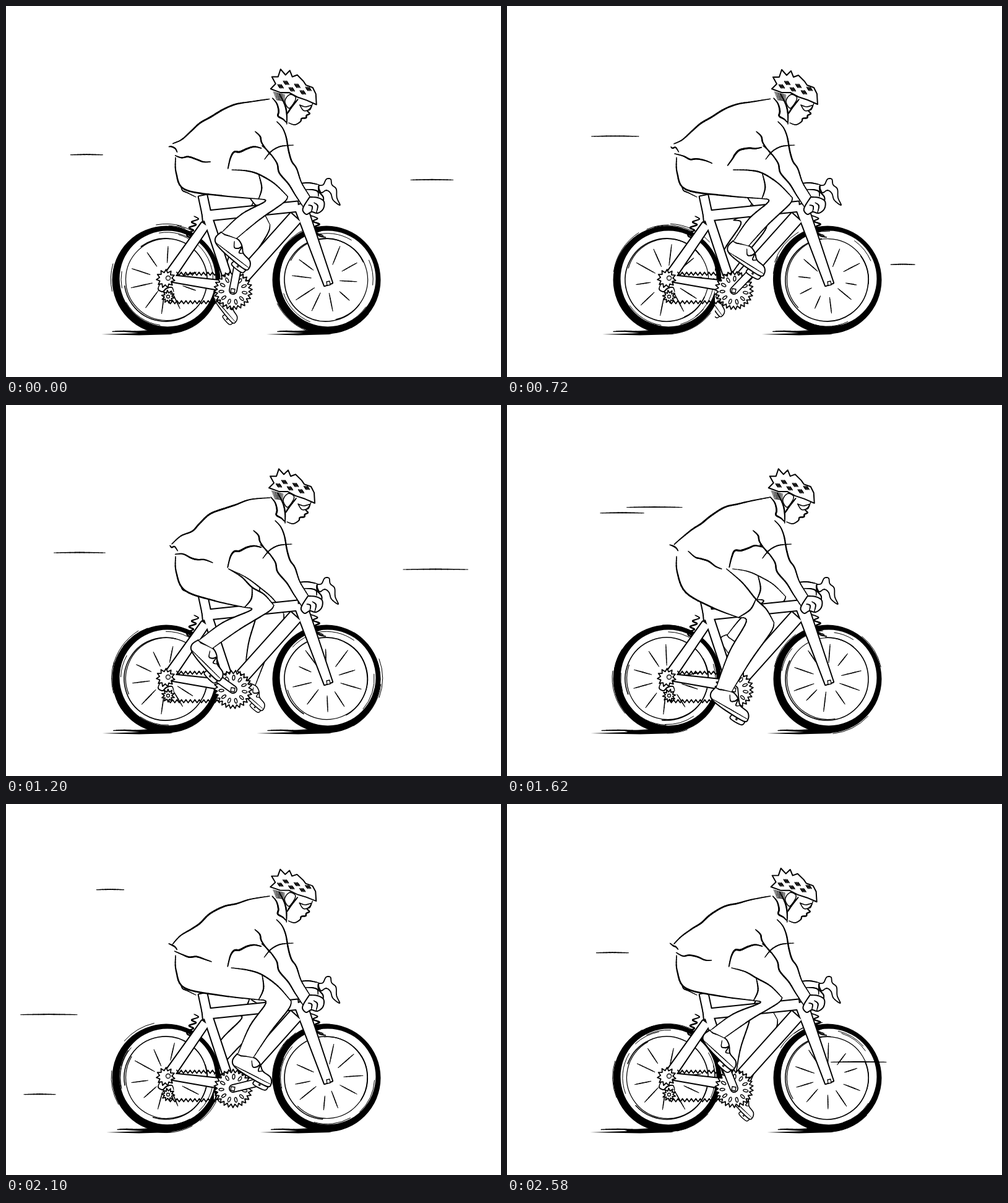
Recreate the animation shown at these times as an HTML page with a canvas. Size 800 by 600 pixels, loop 2.64 s.

```html
<!DOCTYPE html>
<html lang="en">
<head>
<meta charset="utf-8">
<title>Cyclist</title>
<style>
html, body { margin: 0; width: 100%; height: 100%; overflow: hidden; background: #fff; }
canvas { display: block; }
</style>
</head>
<body>
<canvas id="stage" width="800" height="600"></canvas>
<script>
const ctx = document.getElementById('stage').getContext('2d');
const STEP = 60, STEPS = 44, CYCLE = 11, TAU = Math.PI * 2, RAD = Math.PI / 180;
const HUB = [262, 440], FRONT = [521, 450], BOTTOM = [367, 460], CRANK = 44;

const nums = s => s.split(/[ ,]+/).map(Number);
const mix = (a, b, u) => a.map((v, i) => v + (b[i] - v) * u);
const flip = a => a.map((_, i) => a[a.length - 2 - i + 2 * (i % 2)]);

function random(seed) {
  return () => {
    seed = seed + 0x6D2B79F5 | 0;
    let t = Math.imul(seed ^ seed >>> 15, 1 | seed);
    t = t + Math.imul(t ^ t >>> 7, 61 | t) ^ t;
    return ((t ^ t >>> 14) >>> 0) / 4294967296;
  };
}

// Shakes the points of a line, more at its start
function ripple(a, size, rnd) {
  const phase = rnd() * TAU;
  return a.map((v, i) => v + size * (1 - 0.6 * i / a.length) *
    Math.sin(phase + (i >> 1) * 2 + (i % 2 ? 0 : 1.2)) * (i % 2 ? 1 : 0.5));
}

// Smooth run of points through the given ones
function smooth(a) {
  const n = a.length / 2, out = [];
  const at = i => { i = Math.max(0, Math.min(n - 1, i)); return [a[2 * i], a[2 * i + 1]]; };
  for (let i = 0; i < n - 1; i++) {
    const [p, q, r, s] = [-1, 0, 1, 2].map(d => at(i + d));
    for (let k = 0; k < 6; k++) {
      const u = k / 6;
      out.push(...[0, 1].map(j => q[j] + u / 2 * (r[j] - p[j] +
        u * (2 * p[j] - 5 * q[j] + 4 * r[j] - s[j] + u * (3 * q[j] - p[j] - 3 * r[j] + s[j])))));
    }
  }
  return out.concat(at(n - 1));
}

function shape(a) {
  ctx.beginPath();
  for (let i = 0; i < a.length; i += 2) ctx.lineTo(a[i], a[i + 1]);
}
function fill(a, color = '#fff') {
  shape(a);
  ctx.fillStyle = color;
  ctx.fill();
}
function outline(a, w = 2, paper = true) {
  shape(a);
  ctx.closePath();
  if (paper) { ctx.fillStyle = '#fff'; ctx.fill(); }
  ctx.lineWidth = w;
  ctx.stroke();
}
function blob(s, w) { outline(smooth(nums(s)), w); }

// Brush line that thins out at both ends
function ink(a, w = 2) {
  const p = smooth(typeof a === 'string' ? nums(a) : a), n = p.length / 2 - 1;
  for (let i = 0; i < n; i++) {
    ctx.lineWidth = w * (0.6 + 0.5 * Math.sin(Math.PI * (i + 0.5) / n));
    ctx.beginPath();
    ctx.moveTo(p[2 * i], p[2 * i + 1]);
    ctx.lineTo(p[2 * i + 2], p[2 * i + 3]);
    ctx.stroke();
  }
}
function arc(x, y, r, from = 0, to = TAU, w = 1.3) {
  ctx.beginPath();
  ctx.arc(x, y, r, from, to);
  ctx.lineWidth = w;
  ctx.stroke();
}
function gear(x, y, r, teeth, depth, turn) {
  const a = [];
  for (let i = 0; i < teeth * 2; i++) {
    const t = turn + i * Math.PI / teeth, d = r - (i % 2) * depth;
    a.push(x + d * Math.cos(t), y + d * Math.sin(t));
  }
  outline(a, 1.8);
}
function chain(x, end, y) {
  const a = [];
  for (let i = 0; x < end; x += 3.6, i++) a.push(x, y + (i % 2 ? 2.5 : -2.5));
  shape(a);
  ctx.lineWidth = 1.8;
  ctx.stroke();
}
function brake(x, y, lean) {
  const a = [];
  for (let i = 0; i < 8; i++) a.push(x + lean * i + (i % 2 ? 5 : -4), y + 4.6 * i);
  ink(a, 2.2);
  ink([x + lean * 6 - 4, y + 29, x + lean * 7, y + 33, x + lean * 7 + 9, y + 35], 2);
}

function shadow(left, right) {
  fill([left, 531, left + 60, 529, right - 45, 527, right, 524, right + 35, 531, right - 20, 532.5], '#000');
  ink([left + 18, 526.5, (left + right) / 2, 526, right, 528], 2);
}

function wheel(x, y, rnd) {
  ctx.beginPath();
  ctx.arc(x, y, 87.5, 0, TAU);
  ctx.arc(x + 2, y - 2, 77.5, 0, TAU);
  ctx.fillStyle = '#000';
  ctx.fill('evenodd');
  for (let i = 0; i < 10; i++) {
    const t = rnd() * TAU, r = i < 5 ? 86 : 74;
    arc(x + rnd() * 3 - 1, y - 1, r + rnd() * 4, t, t + 0.3 + rnd() * 0.7, 1);
  }
  const turn = rnd() * TAU;
  arc(x - 1, y, 67, turn, turn + 5.2, 1.6);
  arc(x + 0.5, y - 0.5, 66, turn + 3, turn + 7, 1.2);
  for (let i = 0; i < 10; i++) {
    const t = turn + (i + rnd() * 0.3) * TAU / 10, a = 21 + rnd() * 9, b = 47 + rnd() * 12;
    ink([x + a * Math.cos(t), y + a * Math.sin(t), x + b * Math.cos(t), y + b * Math.sin(t)], 1.5);
  }
}

function shoe(x, y, deg, size) {
  ctx.save();
  ctx.translate(x, y);
  ctx.rotate(deg * RAD);
  ctx.scale(size, size);
  blob('-8,1 -7,8 13,8 16,1', 1.8);
  blob('-53,-24 -55,-12 -48,-4 -25,0 13,1 18,-6 12,-15 -3,-18 -11,-25 -17,-29 -25,-31 -36,-28 -46,-24', 2);
  ink('-50,-5 -28,-5 -5,-5 17,-5', 1.3);
  ink('-27,-25 -21,-17 -15,-20 -12,-25 -10,-15 -4,-18', 1.7);
  arc(2, 4, 1.2);
  ctx.restore();
  const c = Math.cos(deg * RAD) * size, s = Math.sin(deg * RAD) * size;
  return (u, v) => [x + u * c - v * s, y + u * s + v * c];
}

// Every joint of the leg swings once per pedal turn
function leg(turn, far) {
  const swing = (mid, size, lag) => mid + size * Math.cos(turn - lag * RAD);
  const hem = [swing(404, 10, 75), swing(295, -25, 35)];
  const bend = [swing(389, 23, 44), swing(329, -18, 30)];
  const knee = [swing(441, 21, 58), swing(331, -23, 18)];
  const foot = swing(35, -10, 115);
  const px = BOTTOM[0] + CRANK * Math.sin(turn), py = BOTTOM[1] - CRANK * Math.cos(turn);
  const local = shoe(px, py, foot + (far ? 16 : 0), far ? 0.78 : 1);
  const heel = local(-52, -24), front = local(-27, -31);

  const tip = [362 - (hem[1] - 285) * 0.25, 265];
  const rise = mix(tip, hem, 0.5), cap = mix(hem, knee, 0.5);
  const thigh = [...tip, rise[0] + 2, rise[1] - 2, ...hem, cap[0] + 2, cap[1] - 3, ...knee];
  const under = [274, 245, 275, 270, 289, 297 + (bend[1] - 313) * 0.2,
    (289 + bend[0]) / 2, 104 + bend[1] * 0.65, ...bend];
  const nook = mix(bend, knee, 0.22), calf = mix(nook, heel, 0.5);
  const back = [...bend, nook[0], nook[1] + 5, calf[0] - 3, calf[1] - 2, ...heel];
  const cup = mix(knee, front, 0.12), mid = mix(knee, front, 0.55);
  const shin = [...knee, cup[0] + 3, cup[1] + 2, ...mid, ...front];

  if (!far) {
    fill([...smooth(under), ...smooth(back), ...flip(smooth(shin)), ...flip(smooth(thigh))]);
    ink(under, 2.4);
  }
  ink(thigh, far ? 1.6 : 2.1);
  ink(back, 1.9);
  ink(shin, 1.9);
  ink([...hem, (hem[0] + bend[0]) / 2 + 5, (hem[1] + bend[1]) / 2 + 2, ...bend], 2);
}

function crank(turn) {
  const [x, y] = BOTTOM;
  ctx.beginPath();
  ctx.moveTo(x, y);
  ctx.lineTo(x + CRANK * Math.sin(turn), y - CRANK * Math.cos(turn));
  ctx.lineWidth = 14;
  ctx.stroke();
  ctx.strokeStyle = '#fff';
  ctx.lineWidth = 10.5;
  ctx.stroke();
  ctx.strokeStyle = '#000';
  outline([x - 3, y - 3, x + 3, y - 2, x + 2, y + 4, x - 4, y + 3], 1.4);
}

function tube(x1, y1, x2, y2, w1, w2 = w1) {
  const len = Math.hypot(x2 - x1, y2 - y1), u = (y1 - y2) / len / 2, v = (x2 - x1) / len / 2;
  return [x1 + u * w1, y1 + v * w1, x2 + u * w2, y2 + v * w2,
    x2 - u * w2, y2 - v * w2, x1 - u * w1, y1 - v * w1];
}

function bike(turn) {
  ink('282,288 285,298 293,302 307,309', 1.6);
  brake(308, 340, -2);
  const seat = [318, 340], neck = [472, 324];
  const tubes = [
    tube(318, 307, 324, 335, 13),
    tube(...HUB, 322, 354, 16, 13),
    tube(...HUB, 348, 452, 9, 15),
    tube(...seat, ...neck, 15),
    tube(326, 342, 356, 433, 13),
    tube(468, 342, 383, 437, 21),
    tube(475, 321, ...FRONT, 19, 13)
  ];
  for (const t of tubes) outline(t, 4, false);
  for (const t of tubes) fill(t);
  brake(497, 339, 1.5);
  outline([518, 446, 523, 445, 524, 451, 519, 452], 1.3);

  chain(276, 345, 433);
  chain(262, 348, 479);
  gear(258, 441, 15, 11, 5, turn);
  arc(...HUB, 3.5);
  ink('249,449 246,458 253,462 259,457 268,455 271,462', 1.7);
  gear(262, 470, 10.5, 10, 4.5, turn);
  arc(262, 470, 2.5);
  gear(...BOTTOM, 31, 26, 5.5, turn);
  for (let i = 0; i < 11; i++) {
    const t = turn + i * TAU / 11;
    ctx.beginPath();
    ctx.ellipse(BOTTOM[0] + 19 * Math.cos(t), BOTTOM[1] + 19 * Math.sin(t), 4, 2, t, 0, TAU);
    ctx.lineWidth = 1.4;
    ctx.stroke();
  }
}

function head(top) {
  ink('430,149 437,158 440,170 439,178 447,183 452,188', 2.4);
  ink('495,157 491,167 486,169 490,174 485,177 484,181 477,182 475,187 466,192 456,189', 2);
  blob('474,160 483,163 493,161 488,168 480,169 474,160', 1.6);
  blob('453,147 459,143 467,147 466,154 458,165 453,162 450,154 453,147', 1.5);
  ink('441,142 450,160 453,175 453,191', 2.2);
  ink('471,151 461,163 454,174', 2.5);
  for (let i = 0; i < 6; i++) ink([431 + i, 139 + i * 2.5, 441, 142 + i * 2, 450, 144 + i * 2], 1);
  ctx.save();
  ctx.translate(0, 135);
  ctx.scale(1, (135 - top) / 33);
  outline(nums('427,-1 435,-9 429,-20 439,-20 443,-32 451,-23 458,-30 462,-20 470,-23 480,-13 484,-7 495,-3 500,7 501,24 485,17 470,12 457,5 443,5'), 2);
  for (let i = 0; i < 6; i++) {
    const x = 443 + 9 * i, y = (i % 2 ? -13 : -5) + 2.4 * i;
    for (const d of [-2.5, 0, 2.5]) ink([x + d - 2, y - 3, x + d + 2, y + 3], 1.7);
  }
  ctx.restore();
}

function handlebar() {
  ink('474,287 489,286 505,289', 1.9);
  ink('480,297 494,297 503,300 504,308', 1.8);
  ink('504,291 505,300 512,309 512,318', 1.9);
  blob('505,290 512,289 517,280 524,280 526,289 533,296 534,310 539,322 528,314 524,303 517,298 509,302 505,295', 1.8);
}

function arm() {
  const outer = nums('437,187 446,197 452,212 456,234 461,251 469,263 477,286 491,309');
  const inner = nums('413,226 424,236 437,254 441,270 456,288 467,306 481,327');
  fill([...smooth(outer), ...flip(smooth(inner)), 408, 210]);
  ink(outer, 2.2);
  ink(inner, 2.2);
  ink('402,203 410,211 413,222 426,240', 2.2);
  ink('417,248 428,235 443,227 464,225', 1.8);
  blob('490,309 503,310 513,316 512,328 503,335 493,333 485,337 479,331 481,323 490,309', 2);
  ink('488,322 494,324 493,333', 1.7);
  ink('497,318 503,323 501,334', 1.7);
}

function shirt(turn, rnd) {
  const low = ((1 - Math.cos(turn - 18 * RAD)) / 2) ** 2;
  const from = [272 + 22 * low, 241 - 3 * low], to = [331 + 18 * low, 253 + 13 * low];
  const hem = ripple([0, 0.2, 0.4, 0.6, 0.8, 1].flatMap(u => mix(from, to, u)), 3, rnd);
  const belly = ripple(nums('358,260 364,247 368,238 377,234 390,231 401,229 412,229'), 3, rnd);
  const back = ripple(nums('269,224 283,214 300,203 313,191 330,178 352,167 372,160 395,154 426,150'), 2.5, rnd);
  fill([...smooth(hem), ...smooth(belly), 440, 187, ...flip(smooth(back))]);
  ink(back, 2.5);
  ink(hem, 2.3);
  ink(belly, 2.7);
  ink(ripple([264, 227, 268, 229, 273, 230, 277, 236], 2, rnd), 2);
}

// Short-lived lines rushing left, most of them behind the rider
function streaks(step) {
  const rnd = random(21);
  for (let i = 0; i < 26; i++) {
    const age = (step - Math.floor(i * STEPS / 26) + STEPS) % STEPS;
    const y = 130 + rnd() * 350, len = 35 + rnd() * 75;
    const right = i % 6 ? 330 - 0.55 * (y - 130) - rnd() * 70 : 700 + rnd() * 80;
    const x = right - len - age * 40;
    if (age < 4) ink([x, y, x + len / 2, y - 0.5, x + len, y], 1.7);
  }
}

function draw(step) {
  const c = step % CYCLE, turn = (11 + c * 360 / CYCLE) * RAD, rnd = random(c * 97 + 5);
  ctx.fillStyle = '#fff';
  ctx.fillRect(0, 0, 800, 600);
  ctx.strokeStyle = '#000';
  ctx.lineCap = ctx.lineJoin = 'round';

  streaks(step);
  shadow(130 + rnd() * 35, 235);
  shadow(390 + rnd() * 40, 492);
  wheel(259, 443, rnd);
  wheel(518, 443, rnd);

  ctx.save();
  ctx.beginPath();
  ctx.rect(336, 0, 464, 600);
  ctx.clip();
  leg(turn + Math.PI, true);
  ctx.restore();

  const sway = 3 * Math.cos(turn - 35 * RAD) - 2;
  bike(turn);
  ctx.save();
  ctx.translate(sway, 0);
  handlebar();
  ctx.restore();
  crank(turn);
  leg(turn, false);
  shirt(turn, rnd);
  ctx.translate(sway, 0);
  arm();
  head(101 + rnd() * 6);
  ctx.translate(-sway, 0);
}

let shown = -1;
const start = performance.now();
function tick(now) {
  const step = Math.floor(Math.max(0, now - start) / STEP) % STEPS;
  if (step !== shown) draw(shown = step);
  requestAnimationFrame(tick);
}
tick(start);
</script>
</body>
</html>
```
